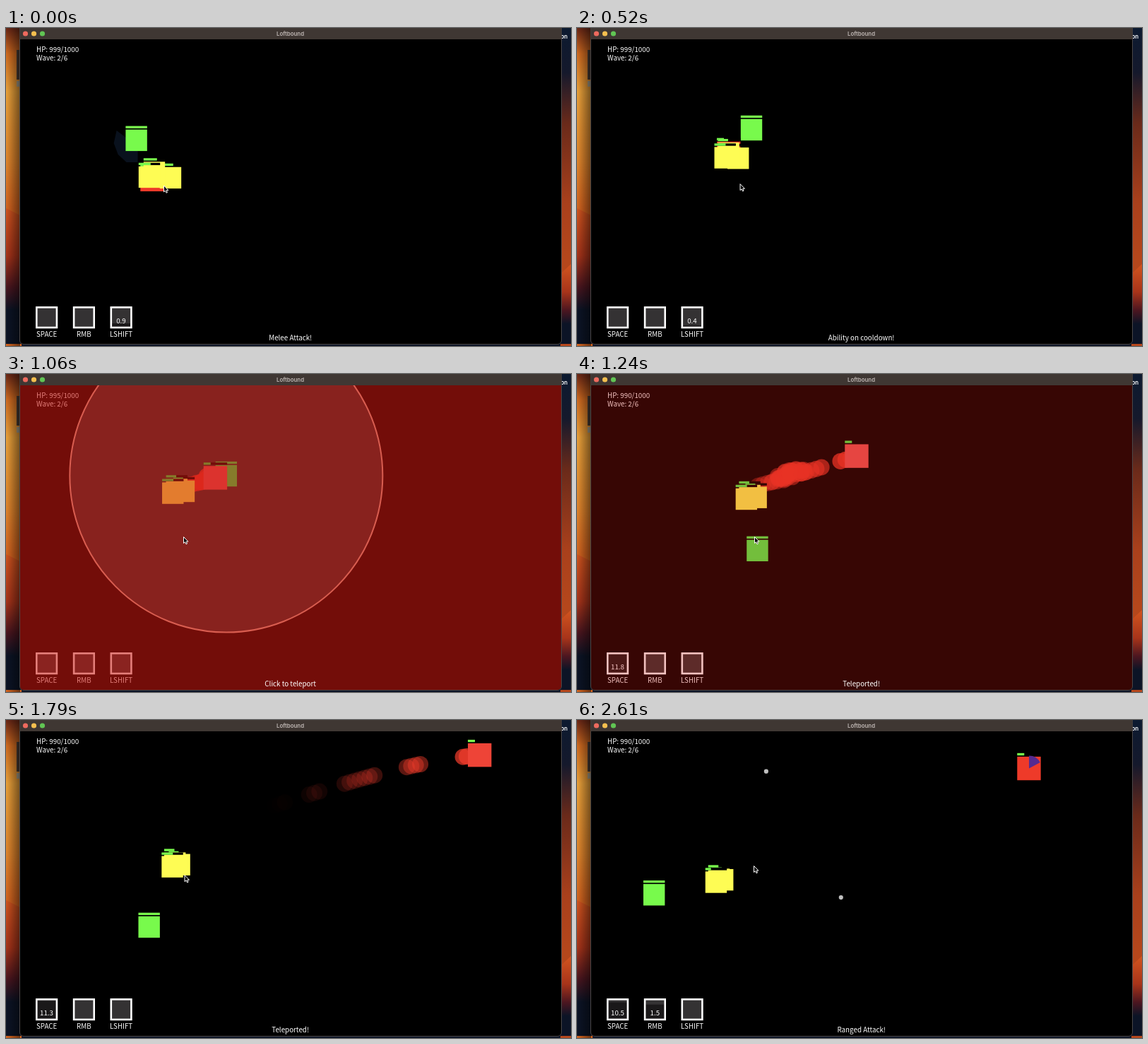
An HTML page that plays this animation: 800x450 px, repeating every 2.64 s.

```html
<!DOCTYPE html>
<html lang="en">
<head>
<meta charset="utf-8">
<title>Loftbound</title>
<style>
html, body { margin: 0; width: 100%; height: 100%; overflow: hidden; background: #0c1426; }
svg { display: block; width: 800px; height: 450px; }
.ui { font: 9.8px "Noto Sans CJK JP", "Noto Sans CJK SC", "Noto Sans", sans-serif; fill: #fff; }
.bar { font: 600 7.9px Inter, sans-serif; fill: #bdb5b2; }
.mid { text-anchor: middle; }
</style>
</head>
<body>
<svg viewBox="0 0 800 450">
  <defs>
    <linearGradient id="left" x2="0" y2="1">
      <stop offset="0" stop-color="#6a2716"/>
      <stop offset=".08" stop-color="#d06a20"/>
      <stop offset=".2" stop-color="#eba23a"/>
      <stop offset=".42" stop-color="#e2862c"/>
      <stop offset=".57" stop-color="#d5641f"/>
    </linearGradient>
    <linearGradient id="low" x2="0" y2="1">
      <stop offset="0" stop-color="#d2551f"/>
      <stop offset=".35" stop-color="#a8341a"/>
      <stop offset=".58" stop-color="#4c1620"/>
      <stop offset=".75" stop-color="#0c1426"/>
    </linearGradient>
    <linearGradient id="right" x2="0" y2="1">
      <stop offset="0" stop-color="#0c1a30"/>
      <stop offset=".14" stop-color="#15192c"/>
      <stop offset=".3" stop-color="#6a2a1a"/>
      <stop offset=".55" stop-color="#a9401c"/>
      <stop offset=".73" stop-color="#b5471c"/>
    </linearGradient>
    <linearGradient id="shade">
      <stop offset="0" stop-color="#000" stop-opacity="0"/>
      <stop offset="1" stop-color="#000" stop-opacity=".5"/>
    </linearGradient>
    <clipPath id="view"><path d="M20 16H786V442a5 5 0 0 1-5 5H25a5 5 0 0 1-5-5Z"/></clipPath>
  </defs>

  <rect width="800" height="450" fill="#0c1426"/>
  <rect width="22" height="450" fill="url(#left)"/>
  <path d="M0 255L22 266V447H0Z" fill="url(#low)"/>
  <rect x="15" y="31" width="6" height="42" fill="#4a3c34"/>
  <rect x="15" y="75" width="6" height="8" fill="#a9a08c"/>
  <rect width="20" height="450" fill="url(#shade)"/>
  <rect x="785" width="15" height="450" fill="url(#right)"/>
  <path d="M785 348L800 334V447H785Z" fill="url(#low)"/>
  <text x="785.5" y="15" class="bar" style="fill:#fff">on</text>

  <path d="M19.5 0V442a5.5 5.5 0 0 0 5.5 5.5H781a5.5 5.5 0 0 0 5.5-5.5V0Z" stroke="#4b4747"/>
  <rect x="19.5" width="767" height="16" fill="#3f3733"/>
  <circle cx="27.5" cy="8" r="3.6" fill="#ed6a5e"/>
  <circle cx="39.5" cy="8" r="3.6" fill="#f4bf4f"/>
  <circle cx="51.5" cy="8" r="3.6" fill="#61c554"/>
  <text x="402.5" y="10.5" class="bar mid">Loftbound</text>

  <g clip-path="url(#view)">
    <g id="world"></g>
    <g id="hud" class="ui"></g>
    <rect id="flash" x="20" y="16" width="766" height="432" fill="#cf1811"/>
  </g>
  <text id="msg" x="402.7" y="441.6" class="ui mid"></text>
  <path id="cursor" d="M0 0V9L2.1 7.2L3.5 10.3L5 9.6L3.7 6.6H6.4Z" fill="#000" stroke="#fff"/>
</svg>
<script>
const LOOP = 2640, AIM = 780, TELEPORT = 1080, SHOT = 2115, IMPACT = 2220;
const DASH = 960, DASH_END = 1860, DASH_TO = { x: 694, y: 48 };
const HITS = [1040, 1075];
const SIZE = 30.4, YELLOW = '#fefc54';
const $ = id => document.getElementById(id);
const clamp = v => Math.min(1, Math.max(0, v));
const rad = deg => deg * Math.PI / 180;

const messages = [[0, 'Melee Attack!'], [300, 'Ability on cooldown!'], [AIM, 'Click to teleport'],
  [TELEPORT, 'Teleported!'], [SHOT, 'Ranged Attack!']];

// Hand movements: start, duration, dx, dy
const strokes = [[0, 400, 4, -4], [400, 500, 24, 11.5], [1640, 360, 4, -28.5], [2110, 390, -5, 4.5]];

function cursorAt(t) {
  const p = { x: 223.5, y: 223 };
  for (const [start, time, dx, dy] of strokes) {
    const k = clamp((t - start) / time), s = k * k * (3 - 2 * k);
    p.x += dx * s;
    p.y += dy * s;
  }
  return p;
}

// The fight, simulated once in 1 ms steps
const between = (t, a, b) => t >= a && t < b;
const bend = (p, k) => p + k * p * p * (1 - p);

function walk(p, t) {
  const dx = (t < 1177) - (between(t, 1177, 1600) || between(t, 1710, 2570));
  const dy = between(t, TELEPORT, 1600) - (t < 125 || between(t, 1800, 2180));
  const from = t === TELEPORT ? cursorAt(t) : p;
  return { x: from.x + .12 * dx, y: from.y + .12 * dy };
}

function chase(p, goal, speed) {
  const a = Math.atan2(goal.y - p.y, goal.x - p.x);
  return { x: p.x + speed * Math.cos(a), y: p.y + speed * Math.sin(a) };
}

function dash(from, t) {
  const q = bend((t - DASH) / (DASH_END - DASH), .38);
  return {
    x: from.x + (DASH_TO.x - from.x) * q,
    y: from.y + (DASH_TO.y - from.y) * bend(q, .8)
  };
}

const states = [{
  player: { x: 184.5, y: 159 },
  red: { x: 207, y: 214.5 },
  mob: [{ x: 203, y: 211 }, { x: 210, y: 204.5 }, { x: 233, y: 212 }]
}];
for (let t = 0; t < LOOP; t++) {
  const { player, red, mob } = states[t];
  states.push({
    player: walk(player, t),
    red: between(t, DASH, DASH_END) ? dash(states[DASH].red, t + 1) : chase(red, player, .077),
    mob: mob.map(m => chase(m, player, .057))
  });
}

// Puffs left by the dash: a cloud around the clash, then short bursts
let seed = 11;
const rand = () => (seed = (seed * 16807) % 2147483647) / 2147483647;
const puffs = [];
const puff = (born, x, y) => puffs.push({ born, x, y });
const burst = (start, count) => {
  for (let t = start; count--; t += 13) puff(t, states[t].red.x, states[t].red.y);
};
for (let i = 0; i < 36; i++) {
  const u = (rand() + rand()) / 2;
  puff(1035 + 62 * u, 273 + 50 * u, 150 - 14 * u + (rand() - .5) * 12);
}
[[985, 4], [1100, 5], [1200, 4], [1300, 3], [1390, 7], [1556, 4], [1730, 2]].forEach(b => burst(...b));

const rect = (x, y, w, h, fill, more = '') =>
  `<rect x="${x}" y="${y}" width="${w}" height="${h}" fill="${fill}" ${more}/>`;
const disc = (x, y, r, fill, more = '') =>
  `<circle cx="${x}" cy="${y}" r="${r}" fill="${fill}" ${more}/>`;
const label = (x, y, s, cls = '') => `<text x="${x}" y="${y}" class="${cls}">${s}</text>`;

function unit({ x, y }, size, fill, health, green) {
  const l = x - size / 2, top = y - size / 2;
  return rect(l, top, size, size, fill) + rect(l, top - 5, size, 3.3, '#000') +
    rect(l, top - 5, health, 3.3, green);
}

function trail(t) {
  return puffs.map(({ born, x, y }) => {
    const age = (t - born) / 600;
    if (age < 0 || age > 1) return '';
    return disc(x, y, 11.5, '#f03c2c', `opacity="${.85 * (1 - age) ** 1.6}"`);
  }).join('');
}

function swing({ x, y }, t) {
  if (t > 90) return '';
  return `<path transform="translate(${x} ${y})" d="M-28 -14L-15 -4L2 15V31H-14L-26 20L-32 4Z"
    fill="#0a121e" opacity="${1 - t / 90}"/>`;
}

function aimRing({ x, y }, t) {
  if (!between(t, AIM, TELEPORT)) return '';
  return disc(x, y, 221.5, '#fff', 'fill-opacity=".19" stroke="#e6b6a0" stroke-width="2"');
}

function dashPie({ x, y }, t) {
  if (t < 1870) return '';
  const a = rad((t - 1870) * .083), r = 18;
  return `<path d="M${x} ${y}V${y - r}A${r} ${r} 0 0 1 ${x + r * Math.sin(a)} ${y - r * Math.cos(a)}Z"
    fill="#552a90"/>`;
}

function shots(t) {
  if (t < SHOT) return '';
  const { x, y } = states[SHOT].player, d = (t - SHOT) * .4235;
  return [-1, 0, 1].map(i => {
    if (i === 0 && t > IMPACT) return '';
    const a = rad(-30.7 + 29.6 * i);
    return disc(x + d * Math.cos(a), y + d * Math.sin(a), 3.1, '#c0c0c0');
  }).join('');
}

function ability(x, name, left, full) {
  const ready = 27 * (1 - left / full);
  return rect(x + 1.3, 395.3, 28.6, 28.6, '#1a1819') + rect(x + 2, 396, 27, ready, '#343233') +
    rect(x + 1.3, 395.3, 28.6, 28.6, 'none', 'stroke="#fff" stroke-width="2.6"') +
    (left > 0 ? label(x + 15.5, 417.7, left.toFixed(1), 'mid') : '') +
    label(x + 15.6, 436.8, name, 'mid');
}

const since = (t, start, full) => t < start ? 0 : Math.max(0, full - (t - start) / 1000);

function draw(t) {
  const { player, red, mob } = states[Math.floor(t)];
  const hit = HITS.filter(h => h <= t).pop();
  const flash = hit ? Math.max(0, .6 - (t - hit) * .002) : 0;
  const green = `rgb(${120 - 140 * flash},250,76)`;
  const heat = t < DASH ? 0 : clamp((DASH_END - t) / 200);
  const redFill = `rgb(238,${58 + 28 * heat},${41 + 42 * heat})`;
  const hurt = t > 60;
  const health = [t > IMPACT ? 8 : hurt ? 16 : 17, hurt ? 14.5 : 19, hurt ? 14 : 19];

  $('world').innerHTML = aimRing(player, t) + swing(player, t) + trail(t) +
    unit(player, SIZE, green, SIZE, green) +
    unit(red, 33.4, redFill, 10, green) + dashPie(red, t) + shots(t) +
    mob.map((m, i) => unit(m, SIZE, YELLOW, health[i], green)).reverse().join('');

  const hp = t < HITS[0] ? 999 : t < HITS[1] ? 995 : 990;
  $('hud').innerHTML = label(43, 33.8, `HP: ${hp}/1000`) + label(43, 46, 'Wave: 2/6') +
    ability(42, 'SPACE', since(t, TELEPORT, 12), 12) +
    ability(94.8, 'RMB', since(t, SHOT, 2), 2) +
    ability(147.5, 'LSHIFT', Math.max(0, .92 - t / 1000), 5);

  const tip = cursorAt(t);
  $('flash').setAttribute('opacity', flash);
  $('msg').textContent = messages.filter(m => m[0] <= t).pop()[1];
  $('cursor').setAttribute('transform', `translate(${tip.x} ${tip.y})`);
}

function tick() {
  draw(performance.now() % LOOP);
  requestAnimationFrame(tick);
}
tick();
</script>
</body>
</html>
```
